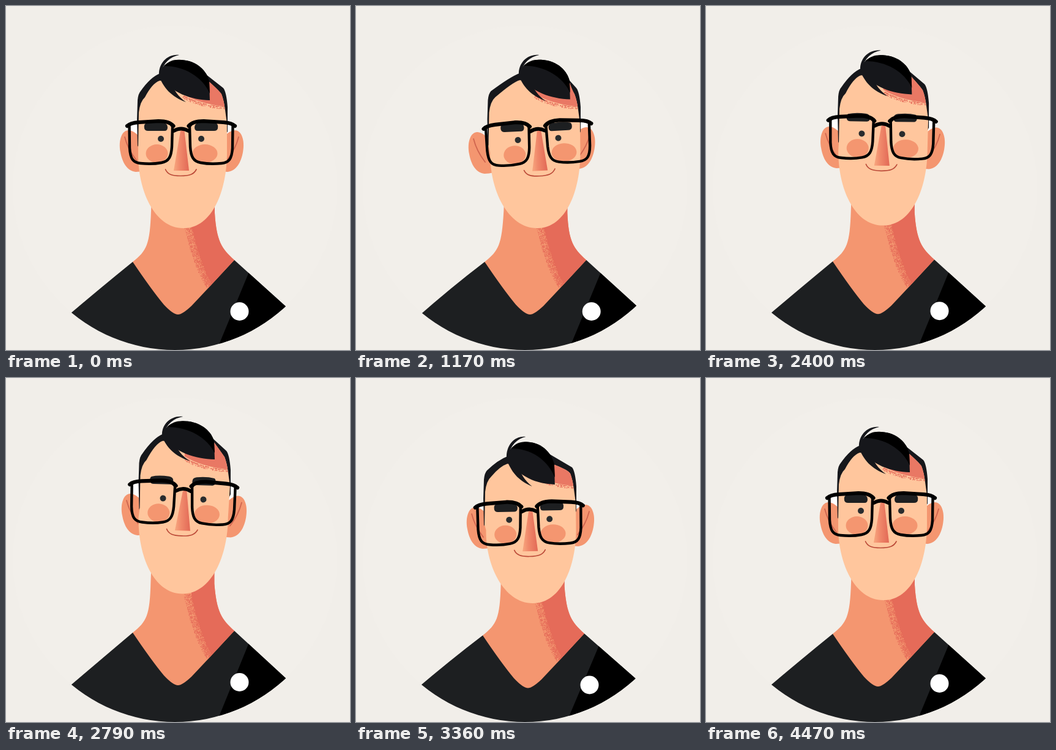
An HTML page with a canvas for the animation above (4500 ms loop, 562 px wide and 562 px high).

```html
<!DOCTYPE html>
<html lang="en">
<head>
<meta charset="utf-8">
<title>Portrait loop</title>
<style>
html, body { margin: 0; width: 100%; height: 100%; overflow: hidden; background: #f1eee9; }
canvas { display: block; width: 100%; height: 100%; }
</style>
</head>
<body>
<canvas id="stage" width="562" height="562"></canvas>
<script>
const ctx = document.getElementById('stage').getContext('2d');
const LOOP = 4500;
const SKIN = '#ffc69d', BLUSH = '#f49670', SHADE = '#e56b59';
const INK = '#16171b', CLOTH = '#1d1f21', LINE = '#bb4a38';

// body: x, y | head: left, right, top, chin x, chin y | quiff: x, y, scale x, scale y
// face: x, y, turn in degrees | ears and brows: left x, y, right x, y
const centre = {
  body: [0, 0], head: [0, 0, 0, 0, 0], quiff: [0, 0, 1, 1],
  face: [0, 0, 0], ears: [0, 0, 0, 0], brows: [0, 0, 0, 0]
};
const turned = {
  body: [3, 0], head: [2, 5, 1, 5, 0], quiff: [17, 1, 1, 1.02],
  face: [11, 0.5, -2.8], ears: [1, 2, 3, -5], brows: [0, 0, -4, 2]
};
const turnedLate = {
  body: [3.2, 0], head: [0.5, 5, 0, 6, 0], quiff: [16, 0, 1.01, 0.98],
  face: [11.5, 0.3, -2.9], ears: [-2, 3, 2.5, -5], brows: [0, -1, -4, 1]
};
const rebound = {
  ...centre, head: [0, 0, -2, 0, -1], quiff: [0.5, -3, 1, 1],
  face: [0, -2.5, 0], ears: [0, -2, 0, -2], brows: [0, -4, 0, -4]
};
const alert = { ...centre, quiff: [0, -0.5, 1, 0.99], brows: [0, -4.5, 0, -4.5] };
const raised = {
  body: [0, -2], head: [2.5, 5, -15, -1.5, -10.5], quiff: [5, -17, 1.036, 0.947],
  face: [3.5, -19.5, 1.7], ears: [3, -14, 5, -10.5], brows: [5, -10, -8, -10]
};
const lowered = {
  body: [0, 2.5], head: [-6, -2, 12, -1, 5], quiff: [-4, 16, 0.95, 1.053],
  face: [-2.8, 14, -1.1], ears: [-5, 8, 1, 4], brows: [3, 0, -4, -1]
};

const timeline = [
  [0, centre], [30, centre], [540, turned], [1170, turnedLate], [1680, rebound],
  [1890, alert], [2100, alert], [2770, raised], [2820, raised],
  [3330, lowered], [3360, lowered], [3870, centre], [LOOP, centre]
];

function poseAt(t) {
  const i = timeline.findIndex(([time]) => time > t);
  const [t0, from] = timeline[i - 1], [t1, to] = timeline[i];
  const k = (1 - Math.cos(Math.PI * (t - t0) / (t1 - t0))) / 2;
  const pose = {};
  for (const part in from) pose[part] = from[part].map((v, n) => v + (to[part][n] - v) * k);
  return pose;
}

const fill = (d, color) => { ctx.fillStyle = color; ctx.fill(new Path2D(d)); };

function stroke(d, color, width) {
  ctx.strokeStyle = color;
  ctx.lineWidth = width;
  ctx.stroke(new Path2D(d));
}

function oval(x, y, rx, ry, color) {
  ctx.fillStyle = color;
  ctx.beginPath();
  ctx.ellipse(x, y, rx, ry, 0, 0, Math.PI * 2);
  ctx.fill();
}

function isolated(draw) {
  ctx.save();
  draw();
  ctx.restore();
}

function random(seed) {
  return () => (seed = (seed * 16807) % 2147483647) / 2147483647;
}

// Specks that thin out sideways from a quadratic curve
function speckle(count, seed, [x0, y0, x1, y1, x2, y2], dx, dy) {
  const rnd = random(seed);
  const at = (a, b, c, t) => a * (1 - t) ** 2 + 2 * b * t * (1 - t) + c * t * t;
  return Array.from({ length: count }, () => {
    const t = rnd(), far = rnd() ** 1.6;
    return [at(x0, x1, x2, t) + dx * far, at(y0, y1, y2, t) + dy * far];
  });
}
const neckGrain = speckle(1200, 71, [303, 355, 315, 417, 341, 462], -13, 0);
const browGrain = speckle(240, 19, [290, 146, 318, 162, 360, 164], -2, 4);

function drawSpecks(specks) {
  ctx.fillStyle = SHADE;
  for (const [x, y] of specks) ctx.fillRect(x, y, 1, 1);
}

function drawBody({ body: [x, y], head: [, , , chin] }) {
  isolated(() => {
    ctx.beginPath();
    ctx.arc(276, 297, 265, 0, Math.PI * 2);
    ctx.clip();
    const tip = x * 0.7;
    const shirt = `M${95 + tip} 511Q155 460 ${207 + x} ${418 + y}L${373 + x} ${415 + y}
      L${475 + tip} 507V580H95Z`;
    fill(shirt, CLOTH);
    ctx.clip(new Path2D(shirt));
    fill(`M${396 + x} ${437 + y}L${348 + x} 553L337 580H500V400H${411 + x}Z`, '#000');
    oval(381.5 + x, 499 + y, 15, 15, '#fff');
  });
  isolated(() => {
    ctx.translate(x, y);
    const lean = chin * 0.4 - x * 0.4;
    const skin = new Path2D(`M${238 + lean} 310L${237 + lean} 335
      C235 390 230 400 207 418Q238 464 258 488Q273 504 281 504Q288 504 303 490
      L335 456L373 415C352 396 344 384 ${341 + lean} 338V310Z`);
    ctx.fillStyle = BLUSH;
    ctx.fill(skin);
    ctx.clip(skin);
    fill('M303 300V355Q315 417 341 462H400V300Z', SHADE);
    drawSpecks(neckGrain);
  });
}

function drawEars({ ears: [lx, ly, rx, ry] }) {
  const ear = (x, y, side) => isolated(() => {
    ctx.translate(x, y);
    ctx.scale(side, 1);
    fill('M0 36C-4 15 3 0 13 0C24 1 36 12 40 30V66Q32 68 25 68C10 66 3 52 0 36Z', BLUSH);
    stroke('M7 11Q12 31 26 49', '#cf654f', 1.8);
  });
  ear(187 + lx, 203 + ly, 1);
  ear(387 + rx, 203 + ry, -1);
}

function drawHead({ head: [lx, rx, top, cx, cy], quiff: [qx, qy, sx, sy] }) {
  const L = 216 + lx, R = 361 + rx;
  const midL = 216 + (lx + cx) / 2, midR = 361 + (rx + cx) / 2;
  const midY = 240 + (top + cy) / 2, chinX = 290 + cx, chinY = 363 + cy;
  const q = (x, y) => [250 + qx + (x - 250) * sx, 79 + qy + (y - 79) * sy];
  const y = v => v + top;
  const [ax, ay] = q(252, 110), [bx, by] = q(313, 101);
  const [ix, iy] = q(251, 122), [jx, jy] = q(331, 123);

  fill(`M${L - 1} ${y(230)}L${L - 2} ${y(185)}L${L - 1} ${y(154)}
    Q${L} ${y(143)} ${L + 4} ${y(139)}Q${ax - 16} ${ay + 6} ${ax} ${ay}L${bx} ${by}
    L${R - 6} ${y(134)}Q${R - 1} ${y(140)} ${R + 1} ${y(165)}
    L${R + 1} ${y(205)}L${R - 4} ${y(215)}H${L + 6}Z`, INK);

  const face = new Path2D(`M${midL} ${midY}L${L} ${y(228)}L${L + 1} ${y(174)}
    Q${L + 3} ${y(156)} ${L + 11} ${y(149)}Q${ix - 12} ${iy + 4} ${ix} ${iy}L${jx} ${jy}
    Q${R - 13} ${y(138)} ${R - 9} ${y(144)}Q${R - 5} ${y(154)} ${R - 3} ${y(170)}
    L${R} ${y(192)}L${midR} ${midY}
    C${midR} ${chinY - 63} ${chinX + 48} ${chinY} ${chinX} ${chinY}
    C${chinX - 48} ${chinY} ${midL - 1} ${chinY - 63} ${midL} ${midY}Z`);
  ctx.fillStyle = SKIN;
  ctx.fill(face);

  isolated(() => {
    ctx.clip(face);
    ctx.translate((lx + rx) / 2, top);
    fill('M288 143Q318 162 370 165V100H290Z', '#e97864');
    drawSpecks(browGrain);
  });
}

function drawQuiff({ quiff: [x, y, sx, sy] }) {
  isolated(() => {
    ctx.translate(250 + x, 79 + y);
    ctx.scale(sx, sy);
    ctx.translate(-250, -79);
    fill('M250 113C249 93 264 78 283 80C268 83 257 93 253 110Z', INK);
    fill('M249 112C257 134 270 148 294 157C281 148 274 137 268 122Z', INK);
    fill('M250 113C253 98 266 88 286 88C313 89 329 108 332 123L333 154C302 153 271 143 250 113Z', INK);
    fill('M258 98C266 90 274 87 286 88C313 89 329 108 332 123L333 143C321 116 292 98 258 98Z', '#000');
  });
}

const lens = 'M201.5 196L202 232C203 250 208 256 220 257Q238 259 254 256C266 254 270 246 271 230L272 197Q268 188 250 188L216 190Q202 191 201.5 196Z';
const brow = 'M-19 0Q-19 -6 -12 -7Q5 -9 17 -6Q20 -4 19 2Q18 6 13 6H-14Q-19 6 -19 0Z';

function mirrored(draw) {
  draw();
  isolated(() => {
    ctx.translate(572, 0);
    ctx.scale(-1, 1);
    draw();
  });
}

function inFace({ face: [x, y, turn] }, draw) {
  isolated(() => {
    ctx.translate(286 + x, 217 + y);
    ctx.rotate(turn * Math.PI / 180);
    ctx.translate(-286, -217);
    draw();
  });
}

function drawFeatures({ face: [slide], brows: [lx, ly, rx, ry] }) {
  oval(246.5, 241, 18, 15, BLUSH);
  oval(325 + slide * 0.2, 241, 20.5, 15, BLUSH);

  const tint = ctx.createLinearGradient(276, 0, 298, 0);
  tint.addColorStop(0, '#f6a17b');
  tint.addColorStop(0.35, '#f0896b');
  tint.addColorStop(1, '#e36b57');
  fill('M285 204L291 200L299 269H274Z', tint);
  stroke('M260.5 267C264 275 271 277.5 285 277.5C300 277.5 307 275 311 267', LINE, 1.7);

  oval(253, 217, 5, 5, '#292c2e');
  oval(319, 217, 5, 5, '#292c2e');

  for (const [x, y, side] of [[245 + lx, 198 + ly, -1], [327 + rx, 198 + ry, 1]]) {
    isolated(() => {
      ctx.translate(x, y);
      ctx.scale(side, 1);
      fill(brow, CLOTH);
    });
  }

  mirrored(() => {
    stroke(lens, '#000', 4.4);
    stroke('M198 196Q203 191 217 190L249 188Q267 188 273.5 196', '#000', 6.2);
  });
  stroke('M274 204Q286 197 298 204', '#000', 6);
}

function draw(t) {
  const pose = poseAt(t);
  ctx.lineCap = ctx.lineJoin = 'round';
  ctx.fillStyle = '#f1eee9';
  ctx.fillRect(0, 0, 562, 562);
  oval(276, 297, 265, 265, '#f2efea');
  drawBody(pose);
  inFace(pose, () => mirrored(() => fill(lens, '#fff')));
  drawEars(pose);
  drawHead(pose);
  drawQuiff(pose);
  inFace(pose, () => drawFeatures(pose));
}

const start = performance.now();
function tick() {
  draw((performance.now() - start) % LOOP);
  requestAnimationFrame(tick);
}
tick();
</script>
</body>
</html>
```
